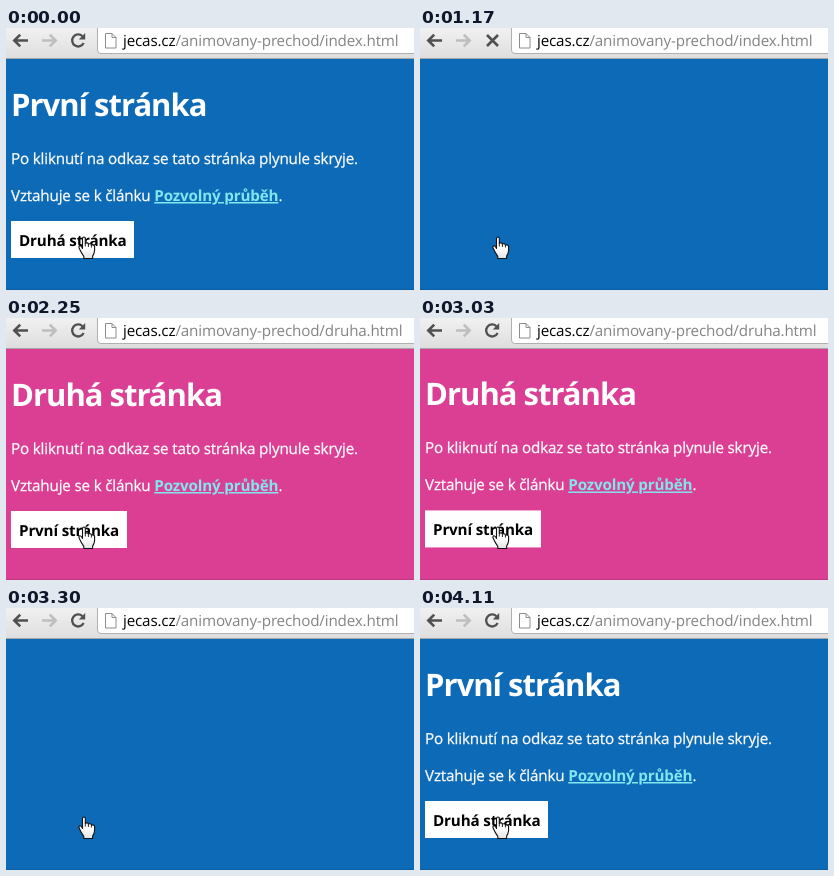
An HTML page for the animation above (4.35 s loop, 408 px wide and 262 px high).

```html
<!DOCTYPE html>
<html lang="cs">
<head>
<meta charset="utf-8">
<title>Přechod mezi stránkami</title>
<style>
  html, body { margin: 0; width: 100%; height: 100%; overflow: hidden; }
  svg { display: block; width: 100vw; height: 100vh; }
  text {
    font: 15.2px "Open Sans", "Noto Sans", sans-serif;
    letter-spacing: -.16px;
    white-space: pre;
    text-rendering: geometricPrecision;
  }
  .bold { font-weight: 700; }
  .body { stroke: #fff; stroke-width: .25; }
  #heading { font-size: 31px; letter-spacing: -1px; }
  #link { fill: #82e6ee; stroke: none; text-decoration: underline; }
</style>
</head>
<body>
<svg viewBox="0 0 408 262">
  <defs>
    <linearGradient id="bar" x2="0" y2="1">
      <stop stop-color="#f1f1f1"/>
      <stop offset="1" stop-color="#dedede"/>
    </linearGradient>
    <linearGradient id="skin" x2="0" y2="1">
      <stop offset=".5" stop-color="#fff"/>
      <stop offset="1" stop-color="#e4e4e4"/>
    </linearGradient>
  </defs>

  <rect id="page" width="408" height="262"/>
  <g id="content" fill="#fff">
    <text id="heading" class="bold" x="5" y="88"></text>
    <text class="body" x="5" y="136">Po kliknutí na odkaz se tato stránka plynule skryje.</text>
    <text class="body" x="5" y="173">Vztahuje se k článku <tspan id="link" class="bold">Pozvolný průběh</tspan>.</text>
    <rect id="button" x="5" y="193" height="37"/>
    <text id="label" class="bold" x="13" y="218" fill="#000"></text>
  </g>
  <rect y="261" width="408" height="1" fill="#000" opacity=".12"/>

  <rect width="408" height="30" fill="url(#bar)"/>
  <rect y="30" width="408" height="1" fill="#a6a6a6"/>
  <path d="M410 25.5H95q-3.5 0-3.5-3.5V-2H410z" fill="#fff" stroke="#b0b0b0"/>
  <g fill="none" stroke="#505050" stroke-width="2.6">
    <path d="M22 12.5H9M14.2 6.6 8.3 12.5l5.9 5.9"/>
    <path d="M36 12.5H49M43.8 6.6l5.9 5.9-5.9 5.9" stroke="#bebebe"/>
    <g id="reload">
      <path d="M77.6 15a6 6 0 1 1-1.2-6.8" stroke-width="2.3"/>
      <path d="M79.2 5v6.4h-6.4z" fill="#505050" stroke="none"/>
    </g>
    <path id="stop" d="M67 7l11 11M78 7l-11 11"/>
  </g>
  <path d="M99.5 5.5h6.5l4 4v10.5h-10.5zM106 5.5v4h4" fill="#fff" stroke="#8c8c8c"/>
  <text x="117" y="18" fill="#000">jecas.cz<tspan id="path" fill="#848484"></tspan></text>

  <g stroke="#111" stroke-linejoin="round">
    <path d="M76.5 220.5V210.6q0-1.6 1.4-1.6t1.4 1.6V215.2q2.6-1 3.1.8 2.500-.8 3 1 2.700-.6 3.200 1.400V222.500q-.3 3.400-2 5.600V230.500H77.800V228.300q-2.600-3.400-4.600-8-.8-2.400.8-2.600 1.200 0 2.500 2.800z" fill="url(#skin)" stroke-width="1.1"/>
    <path d="M79.300 215v3.500M82.400 216v3M85.400 217v2.500" stroke-width=".9"/>
  </g>
</svg>
<script>
const LOOP = 4350;
const LIFT = 100; // how far above its place the hidden text rests
const $ = id => document.getElementById(id);
const clamp = x => Math.min(1, Math.max(0, x));
const smooth = x => x * x * (3 - 2 * x);
const ramp = (t, start, length) => smooth(clamp((t - start) / length));
const mix = (a, b, k) => a.map((v, i) => Math.round(v + (b[i] - v) * k));

const first = { title: 'První stránka', file: 'index', color: '#0d6ab7', width: 123 };
const second = { title: 'Druhá stránka', file: 'druha', color: '#da3f94', width: 116 };

// Times of one visit: page opened, text shown, button hovered, clicked, loading
const visits = [
  { page: second, other: first, open: 1200, show: 1370, hover: 1600, click: 3020, load: 3270 },
  { page: first, other: second, open: 3300, show: 3470, hover: 3700, click: LOOP + 865, load: LOOP + 1170 }
];

function setPage({ page, other }) {
  $('page').setAttribute('fill', page.color);
  $('heading').textContent = page.title;
  $('label').textContent = other.title;
  $('button').setAttribute('width', page.width);
  $('path').textContent = `/animovany-prechod/${page.file}.html`;
}

let current;
function draw(time) {
  let t = time % LOOP;
  if (t < visits[0].open) t += LOOP;
  const visit = t < visits[1].open ? visits[0] : visits[1];
  if (visit !== current) setPage(current = visit);

  const leaving = ramp(t, visit.click, visit.load - visit.click);
  const shown = ramp(t, visit.show, 100) * (1 - leaving);
  $('content').setAttribute('opacity', shown);
  $('content').setAttribute('transform', `translate(0 ${LIFT * (shown - 1)})`);

  const hover = ramp(t, visit.hover, 410);
  $('button').setAttribute('fill', `rgb(${mix([142, 203, 238], [255, 255, 255], hover)})`);

  const loading = t >= visit.load;
  $('stop').setAttribute('visibility', loading ? 'visible' : 'hidden');
  $('reload').setAttribute('visibility', loading ? 'hidden' : 'visible');
}

const begin = performance.now();
function tick() {
  draw(performance.now() - begin);
  requestAnimationFrame(tick);
}
tick();
</script>
</body>
</html>
```
